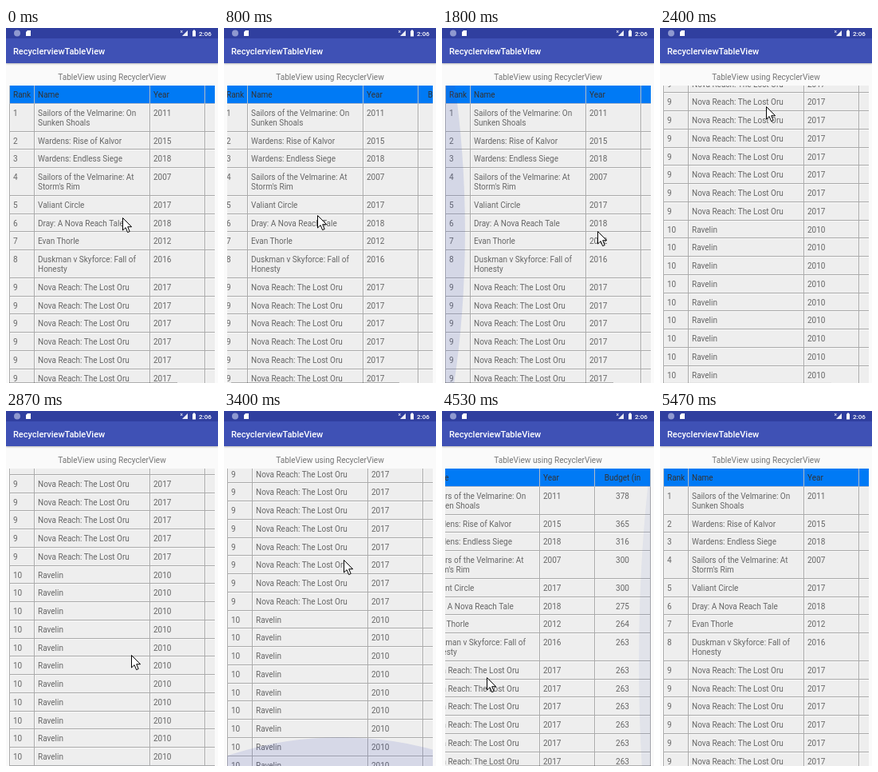
Recreate the animation shown at these times as an HTML page. Size 266 by 444 pixels, loop 5.79 s.

```html
<!DOCTYPE html>
<html lang="en">
<head>
<meta charset="utf-8">
<title>RecyclerviewTableView</title>
<style>
html, body { margin: 0; width: 100%; height: 100%; overflow: hidden; background: #fafafa; }
body { position: relative; font: 10px/12px Roboto, sans-serif; color: #666; }
.abs, .row, .cell { position: absolute; box-sizing: border-box; }
#status { left: 0; top: 0; width: 266px; height: 13px; background: #303f9f; }
#bar { left: 0; top: 13px; width: 266px; height: 31px; background: #3f51b5; box-shadow: 0 1px 2px #0004;
  color: #fff; font-size: 11px; line-height: 33px; font-weight: 500; padding-left: 9px; }
#sub { left: 0; top: 56px; width: 266px; text-align: center; color: #757575; font-size: 10.1px; }
#view { left: 4px; top: 72px; width: 258px; height: 372px; overflow: hidden; }
#list { left: 0; top: 0; width: 316px; }
.row { left: 0; width: 316px; }
.cell { top: 0; height: 100%; padding: 6px 0 0 4px; white-space: pre; background: #eee;
  border: solid #aaa; border-width: 0 1px 1px 0; box-shadow: inset 1px 1px #f8f8f8; }
.cell:first-child { border-left-width: 1px; }
.cell:last-child { text-align: center; padding-left: 0; }
.head .cell { background: #007af5; color: #333; border-color: #b4bcc6; box-shadow: none; }
#thumb { left: 0; top: 371px; width: 211px; height: 1px; background: #0004; }
svg { position: absolute; left: 0; top: 0; overflow: visible; }
</style>
</head>
<body>
<div class="abs" id="bar">RecyclerviewTableView</div>
<div class="abs" id="status">
  <svg width="266" height="13">
    <circle cx="14" cy="6.5" r="4" fill="#8f99d0"/>
    <path d="M27 3h4v7h-6v-5z" fill="#fff"/>
    <path d="M228 3v7h-7z" fill="#fff" opacity=".9"/>
    <path d="M219 3l2.5 3m0-3l-2.5 3" stroke="#fff" stroke-width=".8"/>
    <path d="M235 2.5h2v1h1v7h-4v-7h1z" fill="#fff"/>
    <text x="242" y="10" font-size="8" font-weight="500" fill="#fff">2:06</text>
  </svg>
</div>
<div class="abs" id="sub">TableView using RecyclerView</div>
<div class="abs" id="view">
  <div class="abs" id="list"></div>
  <svg width="258" height="372" fill="#3f51b5">
    <ellipse id="left"/><ellipse id="right"/><ellipse id="bottom"/>
  </svg>
  <div class="abs" id="thumb"></div>
</div>
<svg id="cursor" width="14" height="21">
  <path d="M.5 .5v15.5l3.6-3.4 2.5 6 2.6-1.1-2.5-5.8h4.9z" fill="#fff" stroke="#000"/>
</svg>
<script>
const LOOP = 5790, STEP = 200 / 3, LINE = 12, ROW = 22.75;
const VIEW = { x: 4, y: 72, w: 258, h: 372 };
const COLS = [32, 145, 69, 70], MAX_X = 58, MAX_Y = 324;
const $ = id => document.getElementById(id);

const movies = [
  ['1', 'Sailors of the Velmarine: On\nSunken Shoals', 2011, 378],
  ['2', 'Wardens: Rise of Kalvor', 2015, 365],
  ['3', 'Wardens: Endless Siege', 2018, 316],
  ['4', "Sailors of the Velmarine: At\nStorm's Rim", 2007, 300],
  ['5', 'Valiant Circle', 2017, 300],
  ['6', 'Dray: A Nova Reach Tale', 2018, 275],
  ['7', 'Evan Thorle', 2012, 264],
  ['8', 'Duskman v Skyforce: Fall of\nHonesty', 2016, 263],
  ...Array(9).fill(['9', 'Nova Reach: The Lost Oru', 2017, 263]),
  ...Array(11).fill(['10', 'Ravelin', 2010, 260])
];

let nextTop = 0;
function addRow(data, cls = '') {
  const row = document.createElement('div');
  const height = ROW + (data[1].includes('\n') ? LINE : 0);
  row.className = 'row ' + cls;
  row.style.top = nextTop + 'px';
  row.style.height = height + 'px';
  let x = 0;
  data.forEach((text, i) => {
    const cell = document.createElement('div');
    cell.className = 'cell';
    cell.textContent = text;
    cell.style.left = x + 'px';
    cell.style.width = COLS[i] + 'px';
    x += COLS[i];
    row.append(cell);
  });
  $('list').append(row);
  nextTop += height;
}
addRow(['Rank', 'Name', 'Year', 'Budget (in'], 'head');
movies.forEach(m => addRow(m));

// Smooth 0 to 1 between two times.
function ramp(t, from, to) {
  const p = Math.min(1, Math.max(0, (t - from) / (to - from)));
  return p * p * (3 - 2 * p);
}
// Rises at one time, falls at another.
const show = (t, on, off, rise, fall) => ramp(t, on, on + rise) - ramp(t, off, off + fall);

// Pointer moves: from, to, x, y.
const moves = [
  [0, 70, 109, 230], [200, 470, 124, 234],
  [730, 1070, 60, 233], [1330, 1800, 195, 254],
  [1800, 2070, 165, 376], [2200, 2400, 133, 98],
  [2530, 2800, 158, 320], [2800, 3200, 150, 130],
  [3330, 3400, 150, 186], [3400, 3800, 150, 390],
  [4130, 4530, 56, 333], [4600, 4930, 190, 330]
];
function pointerAt(t) {
  return moves.reduce(([px, py], [from, to, x, y]) => {
    const p = ramp(t, from, to);
    return [px + (x - px) * p, py + (y - py) * p];
  }, [146, 237]).map(Math.round);
}

const scrollX = t => MAX_X * (show(t, 730, 1330, 340, 340) + show(t, 4130, 4530, 270, 400));
const scrollY = t => MAX_Y * show(t, 2200, 3330, 263, 265);
const thumbAlpha = t => show(t, -300, 200, 70, 270) + show(t, 730, 2200, 70, 270)
  + show(t, 4130, 5200, 70, 270);

// Screen updates land every 1/15 s, rounded to 10 ms.
function tick(t) {
  const time = n => Math.round(n * STEP / 10) * 10;
  let n = Math.ceil(t / STEP);
  while (time(n) > t) n--;
  return time(n);
}

// Edge glow: a flattened circle just past the edge that leans towards the pointer.
function drawGlow(id, pull, size, alpha, [px, py]) {
  const flat = id === 'bottom';
  const across = flat ? VIEW.w : VIEW.h;
  const touch = flat ? px - VIEW.x : py - VIEW.y;
  const mid = across / 2 + (touch - across / 2) * .75;
  const r = across * 1.35, depth = r * size * pull, far = depth * .866;
  const [cx, cy] = flat ? [mid, VIEW.h + far] : [id === 'left' ? -far : VIEW.w + far, mid];
  const [rx, ry] = flat ? [r, depth] : [depth, r];
  Object.entries({ cx, cy, rx, ry, opacity: alpha * pull })
    .forEach(([name, value]) => $(id).setAttribute(name, value));
}

function draw(t) {
  const x = Math.round(scrollX(t)), y = Math.round(scrollY(t)), pointer = pointerAt(t);
  $('list').style.transform = `translate(${-x}px, ${-y}px)`;
  $('thumb').style.transform = `translateX(${x * 258 / 316}px)`;
  $('thumb').style.opacity = thumbAlpha(t);
  $('cursor').style.transform = `translate(${pointer[0]}px, ${pointer[1]}px)`;
  $('cursor').style.visibility = t < 5000 ? 'visible' : 'hidden';
  drawGlow('left', show(t, 1600, 1800, 200, 270), .37, .15, pointer);
  drawGlow('right', show(t, 1070, 1330, 260, 270) + show(t, 4400, 4600, 200, 200), .31, .1, pointer);
  drawGlow('bottom', show(t, 2800, 3330, 400, 500), .81, .15, pointer);
}

const start = performance.now();
function loop() {
  draw(tick((performance.now() - start) % LOOP));
  requestAnimationFrame(loop);
}
loop();
</script>
</body>
</html>
```
